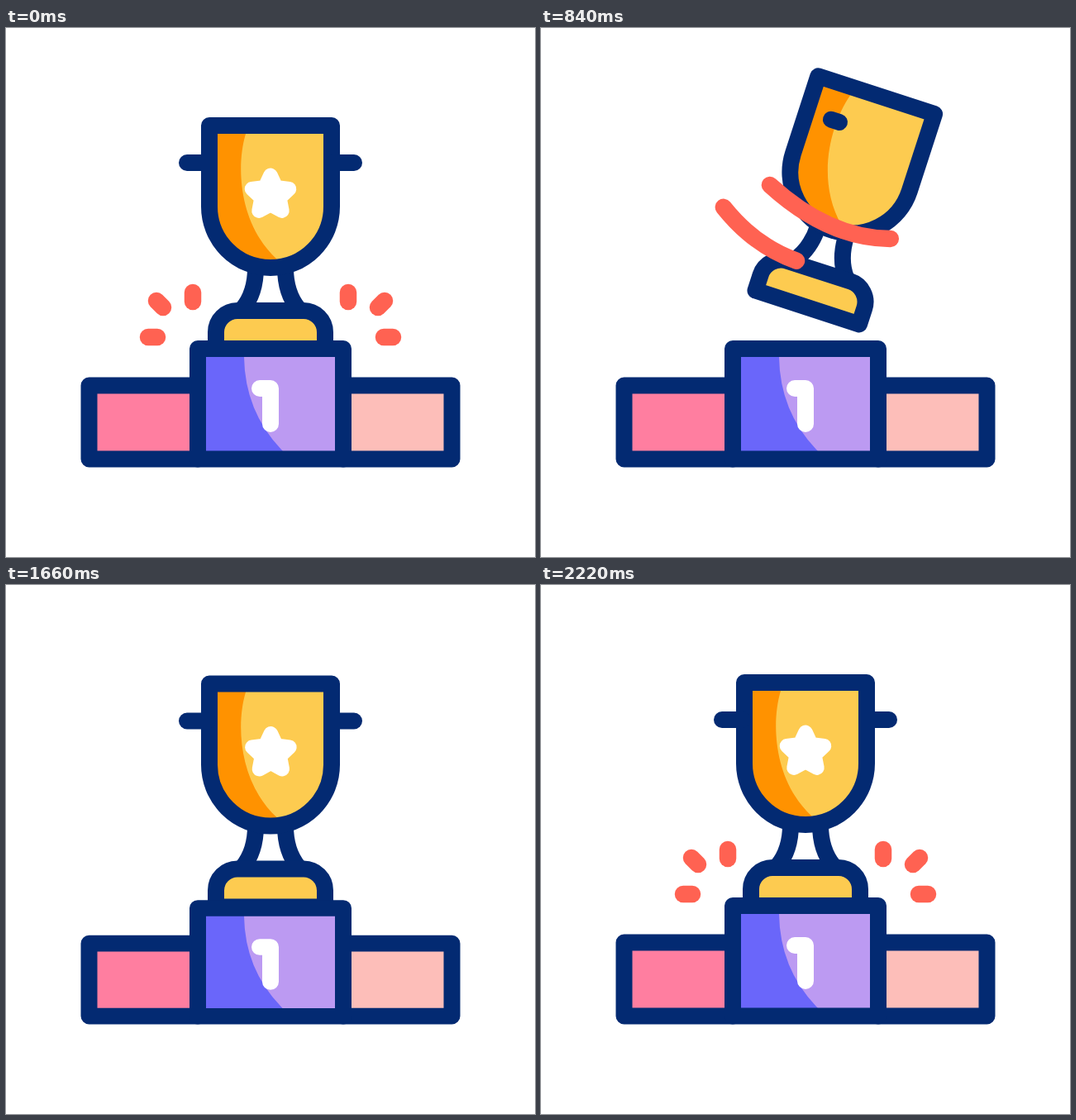
Write an HTML page that moves like this. It is 640x640 px and loops after 2400 ms.

```html
<!DOCTYPE html>
<html lang="en">
<head>
<meta charset="utf-8">
<title>Trophy</title>
<style>
  html, body { margin: 0; width: 100%; height: 100%; overflow: hidden; background: #fff; }
  svg { display: block; width: 100vw; height: 100vh; }
  .line { fill: none; stroke: #032a72; stroke-width: 20; stroke-linecap: round; stroke-linejoin: round; }
  .gold { fill: #fdcb50; }
  .trim { fill: none; stroke: #ff6252; stroke-width: 20.5; stroke-linecap: round; }
  .white { fill: none; stroke: #fff; stroke-width: 20; stroke-linecap: round; stroke-linejoin: round; }
</style>
</head>
<body>
<svg viewBox="0 0 640 640">
  <defs>
    <path id="cup" d="M246 118H394V216A74 74 0 0 1 246 216Z"/>
    <clipPath id="inside"><use href="#cup"/></clipPath>
  </defs>

  <g id="sparks"></g>

  <g id="trophy">
    <g id="back"></g>
    <path class="line" d="M302 290C302 312 296 328 286 340M338 290C338 312 344 328 354 340"/>
    <path class="line gold" style="fill:#fdcb50" d="M254 388V368A26 26 0 0 1 280 342H360A26 26 0 0 1 386 368V388Z"/>
    <g clip-path="url(#inside)">
      <use href="#cup" class="gold"/>
      <path fill="#ff9200" d="M240 110H296L290 128C278 168 282 238 328 280L340 292H240Z"/>
      <path id="star" fill="#fff" stroke="#fff" stroke-width="17.5" stroke-linejoin="round"/>
    </g>
    <use href="#cup" class="line"/>
    <g id="front"></g>
    <path id="swoosh1" class="trim" d="M390 278Q317 301 228.5 260"/>
    <path id="swoosh2" class="trim" d="M290 338.5Q235 337 184.5 303"/>
  </g>

  <g id="sides">
    <rect class="line" style="fill:#ff7ea0" x="100.5" y="432.5" width="131.5" height="89"/>
    <rect class="line" style="fill:#fdbeb9" x="408" y="432.5" width="131.5" height="89"/>
  </g>
  <g id="middle">
    <rect fill="#bc9af2" x="232" y="388" width="176" height="133.5"/>
    <path fill="#6a66fa" d="M232 388H288V398Q289 465 335 512V521H232Z"/>
    <rect class="line" x="232" y="388" width="176" height="133.5"/>
    <path class="white" d="M307 436H320V479"/>
  </g>
</svg>
<script>
const LOOP = 2400, STEP = 20, FLOOR = 531.5;
const $ = id => document.getElementById(id);
const clamp = u => Math.min(1, Math.max(0, u));
const smooth = u => u * u * (3 - 2 * u);

function add(parent, cls, d) {
  const p = document.createElementNS('http://www.w3.org/2000/svg', 'path');
  p.setAttribute('class', cls);
  if (d) p.setAttribute('d', d);
  return parent.appendChild(p);
}

// Eased value through alternating time, value keys
function track(t, ...keys) {
  if (t <= keys[0]) return keys[1];
  for (let i = 2; i < keys.length; i += 2) {
    if (t < keys[i]) {
      const u = (t - keys[i - 2]) / (keys[i] - keys[i - 2]);
      return keys[i - 1] + (keys[i + 1] - keys[i - 1]) * smooth(u);
    }
  }
  return keys[keys.length - 1];
}

// Show only the part of a path between fractions a and b
function trim(path, a, b) {
  const len = path.getTotalLength(), on = b - a > 0.001;
  path.style.display = on ? '' : 'none';
  if (on) {
    path.style.strokeDasharray = `${(b - a) * len} ${len * 3}`;
    path.style.strokeDashoffset = -a * len;
  }
}

// Each spark runs from its inner to its outer end
const sparks = [];
for (const [x1, y1, x2, y2] of [[226, 331, 226, 320], [190, 338, 182, 330], [183, 374, 172, 374]]) {
  sparks.push(add($('sparks'), 'trim', `M${x1} ${y1}L${x2} ${y2}`));
  sparks.push(add($('sparks'), 'trim', `M${640 - x1} ${y1}L${640 - x2} ${y2}`));
}

const handles = { front: add($('front'), 'line'), back: add($('back'), 'line') };
function setHandle(path, s) {
  path.setAttribute('d', `M${320 + 76 * s} 163H${320 + 101 * s}`);
}

$('star').setAttribute('d', 'M' + Array.from({ length: 10 }, (_, i) => {
  const r = i % 2 ? 11.5 : 23.7, a = i * Math.PI / 5;
  return `${320 + r * Math.sin(a)} ${202 - r * Math.cos(a)}`;
}).join('L') + 'Z');

function stretch(el, k) {
  el.setAttribute('transform', `translate(0 ${-FLOOR * k}) scale(1 ${1 + k})`);
}

function draw(t) {
  const k = track(t, 200, 0, 260, -0.02, 320, 0, 560, 0, 600, -0.025, 650, 0,
    1610, 0, 1690, -0.03, 1820, 0.02, 1880, 0, 2070, 0, 2120, -0.025, 2200, 0);
  stretch($('middle'), t < 220 ? 0 : k);
  stretch($('sides'), t < 220 ? 0 : k * 0.6);

  const tilt = track(t, 600, 0, 797, 18, 1420, 18, 1630, 0);
  const jump = track(t, 220, 0, 392, -38, 590, 0, 610, 0, 822, -50, 1420, -50, 1640, 0,
    1820, 0, 1960, -58, 2090, 0);
  const y = jump - (t < 220 ? 0 : k * 75);
  $('trophy').setAttribute('transform',
    `translate(${320 + tilt / 8} ${388 + y}) rotate(${tilt}) translate(-320 -388)`);

  // Two half turns: speeding up, then slowing down
  const turn = t < 1005
    ? Math.pow(clamp((t - 220) / 785), 1.436)
    : 1 - Math.pow(1 - clamp((t - 1005) / 650), 1.68);
  setHandle(handles.front, 1 - 2 * turn);
  setHandle(handles.back, 2 * turn - 1);

  const slide = t < 790 ? track(t, 220, 0, 640, -113) : track(t, 790, 113, 1690, 0);
  $('star').setAttribute('transform', `translate(${slide} 0)`);

  const grow = track(t, 605, 0, 860, 1), fade = track(t, 1210, 0, 1520, 1);
  trim($('swoosh1'), fade, grow);
  trim($('swoosh2'), fade, grow);

  const gone = track(t, 220, 0, 388, 1), back = track(t, 2050, 0, 2220, 1);
  for (const s of sparks) t < 1000 ? trim(s, gone, 1) : trim(s, 0, back);
}

const start = performance.now();
function tick() {
  const t = (performance.now() - start) % LOOP;
  draw(Math.floor(t / STEP) * STEP);
  requestAnimationFrame(tick);
}
tick();
</script>
</body>
</html>
```
